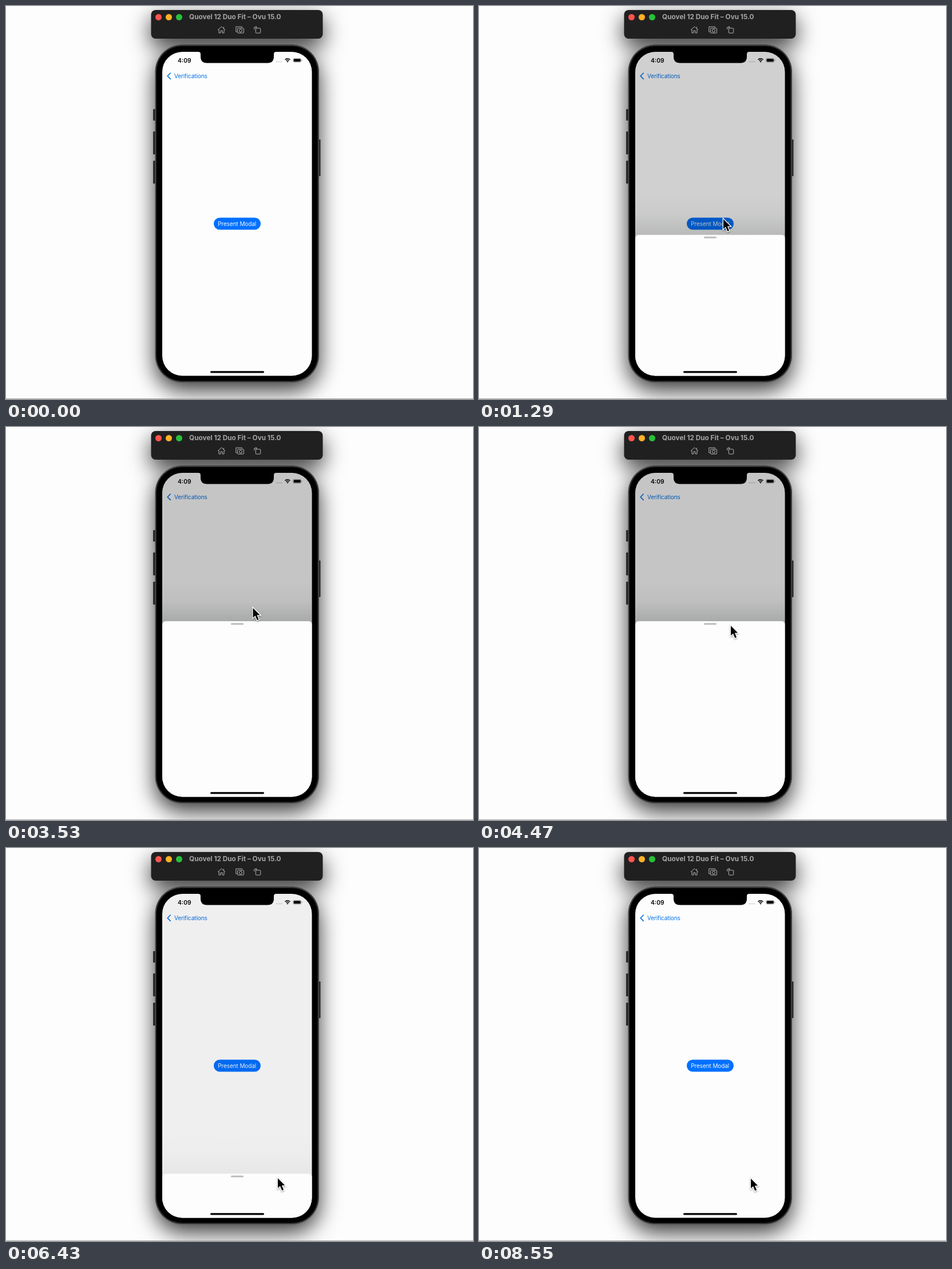
Recreate the animation shown at these times as an HTML page with a canvas. Size 816 px wide and 686 px high, loop 8.57 s.

```html
<!DOCTYPE html>
<html lang="en">
<head>
<meta charset="utf-8">
<title>Sheet presentation</title>
<style>
html, body { margin: 0; width: 100%; height: 100%; overflow: hidden; background: #fdfdfd; }
canvas { display: block; width: 816px; height: 686px; }
</style>
</head>
<body>
<canvas id="stage" width="816" height="686"></canvas>
<script>
const W = 816, H = 686, LOOP = 8570;
const FONT = 'Inter, "Liberation Sans", sans-serif';
const REST = 339, BOTTOM = 645;
const PRESENT = 1040, GRAB = 4550, RELEASE = 6500;

// Pointer path: time, x, y
const PATH = [
  [350, 470, 704], [900, 427, 372], [1800, 427, 372], [2500, 428, 303],
  [3100, 428, 303], [4300, 440, 347], [GRAB, 440, 347], [5200, 454, 232],
  [5600, 454, 232], [6450, 475, 577]
];

const ctx = document.getElementById('stage').getContext('2d');

function box(g, x, y, w, h, r, color) {
  g.beginPath();
  g.roundRect(x, y, w, h, r);
  g.fillStyle = color;
  g.fill();
}

function line(g, points, color, width) {
  g.beginPath();
  points.forEach(([x, y], i) => i ? g.lineTo(x, y) : g.moveTo(x, y));
  g.strokeStyle = color;
  g.lineWidth = width;
  g.stroke();
}

function dot(g, x, y, r, color) {
  g.beginPath();
  g.arc(x, y, r, 0, Math.PI * 2);
  g.fillStyle = color;
  g.fill();
}

function label(g, text, x, y, size, weight, color, spacing = '0px') {
  g.font = `${weight} ${size}px ${FONT}`;
  g.letterSpacing = spacing;
  g.fillStyle = color;
  g.fillText(text, x, y);
}

function withShadow(g, draw) {
  g.save();
  g.shadowColor = 'rgba(0,0,0,0.8)';
  g.shadowBlur = 38;
  g.shadowOffsetY = 14;
  draw();
  g.restore();
}

function toolIcons(g) {
  const c = '#b4b4b4';
  g.lineJoin = 'round';
  line(g, [[370, 41.8], [376.5, 36], [383, 41.8]], c, 1);
  line(g, [[372, 41], [372, 47], [375, 47], [375, 43], [378, 43], [378, 47], [381, 47], [381, 41]], c, 1);
  line(g, [[380.5, 39], [380.5, 36.5]], c, 1);

  line(g, [[403.5, 45], [401.8, 45], [401.8, 36.2], [412.5, 36.2], [412.5, 37.5]], c, 1);
  g.beginPath();
  g.roundRect(404.5, 38.8, 11, 8.4, 1.2);
  g.stroke();
  g.beginPath();
  g.arc(410, 43, 2.5, 0, Math.PI * 2);
  g.stroke();

  g.beginPath();
  g.roundRect(436.3, 38.8, 8.4, 8.4, 1);
  g.stroke();
  line(g, [[433.8, 41], [433.8, 37], [438, 37]], c, 1);
  line(g, [[436.3, 35], [438.3, 37], [436.3, 39]], c, 1);
}

function drawBase(g) {
  g.fillStyle = '#fdfdfd';
  g.fillRect(0, 0, W, H);
  withShadow(g, () => box(g, 261, 67.5, 285.5, 589, 47, '#000'));
  withShadow(g, () => box(g, 253.5, 7, 300, 50, 8, '#202021'));

  for (const [y, h] of [[180, 20], [219, 40], [270, 40]]) box(g, 257, y, 5, h, 1.2, '#29292c');
  box(g, 545, 233, 4.5, 64, 1.2, '#29292c');

  box(g, 260.5, 67.5, 286.5, 589.5, 47, '#4b4b4a');
  box(g, 262, 69, 283.5, 586.5, 45.5, '#20201f');
  box(g, 263.2, 70.2, 281, 584, 44.5, '#000');

  ['#ff544d', '#feb225', '#27c13a'].forEach((c, i) => dot(g, 266.5 + i * 18, 19.5, 5.5, c));
  label(g, 'Quovel 12 Duo Fit – Ovu 15.0', 320, 23.4, 11.8, 700, '#a5a5a6');
  toolIcons(g);
  g.fillStyle = '#a7a7a7';
  g.fillRect(0, 685, W, 1);
}

function statusBar(g) {
  label(g, '4:09', 300, 98.6, 10.3, 600, '#000');
  for (let i = 0; i < 4; i++) dot(g, 472.6 + i * 3, 97.3, 0.9, 'rgba(0,0,0,0.28)');
  g.strokeStyle = '#000';
  g.lineWidth = 1.5;
  for (const r of [3.7, 6.2]) {
    g.beginPath();
    g.arc(492, 98, r, -Math.PI * 0.76, -Math.PI * 0.24);
    g.stroke();
  }
  g.beginPath();
  g.moveTo(492, 98.6);
  g.arc(492, 98.4, 2.2, -Math.PI * 0.76, -Math.PI * 0.24);
  g.fillStyle = '#000';
  g.fill();

  g.beginPath();
  g.roundRect(501.6, 91.3, 14.2, 7, 2.1);
  g.strokeStyle = 'rgba(0,0,0,0.4)';
  g.lineWidth = 0.7;
  g.stroke();
  box(g, 502.6, 92.3, 12.2, 5, 1.2, '#000');
  box(g, 516.7, 93.6, 0.9, 2.4, 0.5, 'rgba(0,0,0,0.4)');
}

function page(g) {
  g.fillStyle = '#fdfdfd';
  g.fillRect(273, 80, 262, 566);
  statusBar(g);
  g.lineCap = 'round';
  g.lineJoin = 'round';
  line(g, [[287.3, 117], [282.2, 122.2], [287.3, 127.4]], '#006fe6', 1.6);
  label(g, 'Verifications', 294, 125.8, 10, 400, '#006fe6', '-0.1px');
  box(g, 363, 369.5, 82, 21, 10.5, '#0070ff');
  label(g, 'Present Modal', 370.3, 383.8, 10, 400, '#f5faff', '-0.1px');
}

function notch(g) {
  g.beginPath();
  g.moveTo(336, 79);
  g.lineTo(336, 80);
  g.quadraticCurveTo(340, 80, 340, 84);
  g.lineTo(340, 88);
  g.quadraticCurveTo(340, 99.5, 351, 99.5);
  g.lineTo(457, 99.5);
  g.quadraticCurveTo(468, 99.5, 468, 88);
  g.lineTo(468, 84);
  g.quadraticCurveTo(468, 80, 472, 80);
  g.lineTo(472, 79);
  g.fillStyle = '#000';
  g.fill();
}

function pointerAt(t) {
  if (t <= PATH[0][0]) return PATH[0].slice(1);
  for (let i = 1; i < PATH.length; i++) {
    const [t0, x0, y0] = PATH[i - 1], [t1, x1, y1] = PATH[i];
    if (t < t1) {
      const u = (t - t0) / (t1 - t0), e = u * u * (3 - 2 * u);
      return [x0 + (x1 - x0) * e, y0 + (y1 - y0) * e];
    }
  }
  return PATH[PATH.length - 1].slice(1);
}

// Critically damped spring progress
function spring(ms, rate) {
  const k = Math.max(0, ms) / 1000 * rate;
  return 1 - (1 + k) * Math.exp(-k);
}

// Dragging above the resting place meets resistance
function draggedTo(t) {
  const d = pointerAt(t)[1] - 347;
  return REST + (d < 0 ? d * 0.2 : d);
}

function sheetTop(t) {
  if (t < PRESENT) return BOTTOM + 5;
  if (t < GRAB) return BOTTOM + (REST - BOTTOM) * spring(t - PRESENT, 12);
  if (t < RELEASE) return draggedTo(t);
  const from = draggedTo(RELEASE);
  return from + (BOTTOM + 3 - from) * spring(t - RELEASE, 13.6);
}

function sheet(g, y) {
  const shown = Math.max(0, Math.min(1, (BOTTOM - y) / (BOTTOM - REST)));
  if (!shown) return;
  g.fillStyle = `rgba(0,0,0,${0.225 * shown})`;
  g.fillRect(273, 80, 262, 566);

  const reach = 70, fade = g.createLinearGradient(0, y - reach, 0, y);
  fade.addColorStop(0, 'rgba(20,35,25,0)');
  fade.addColorStop(0.5, `rgba(20,35,25,${0.04 * shown})`);
  fade.addColorStop(1, `rgba(20,35,25,${0.16 * shown})`);
  g.fillStyle = fade;
  g.fillRect(273, y - reach, 262, reach + 8);

  box(g, 273, y, 262, 330, [6, 6, 0, 0], '#fdfdfd');
  box(g, 393, y + 3.2, 22, 3, 1.5, '#bcbcc0');
}

function pointer(g, x, y) {
  g.save();
  g.translate(x, y);
  g.beginPath();
  [[0, 0], [0, 17], [4, 13.4], [7.3, 21.3], [10.1, 20.1], [6.9, 12.4], [12.2, 12.2]]
    .forEach(([a, b], i) => i ? g.lineTo(a, b) : g.moveTo(a, b));
  g.closePath();
  g.lineJoin = 'miter';
  g.shadowColor = 'rgba(0,0,0,0.35)';
  g.shadowBlur = 3;
  g.shadowOffsetY = 1.5;
  g.strokeStyle = '#fff';
  g.lineWidth = 2.6;
  g.stroke();
  g.shadowColor = 'transparent';
  g.fillStyle = '#000';
  g.fill();
  g.restore();
}

const base = document.createElement('canvas');
base.width = W;
base.height = H;
drawBase(base.getContext('2d'));

function render(t) {
  ctx.drawImage(base, 0, 0);
  ctx.save();
  ctx.beginPath();
  ctx.roundRect(273, 80, 261.5, 565.5, 35);
  ctx.clip();
  page(ctx);
  sheet(ctx, sheetTop(t));
  notch(ctx);
  box(ctx, 357, 637.3, 94, 3.2, 1.6, '#000');
  ctx.restore();
  if (t > PATH[0][0]) pointer(ctx, ...pointerAt(t));
}

const start = performance.now();
function tick() {
  render((performance.now() - start) % LOOP);
  requestAnimationFrame(tick);
}
tick();
</script>
</body>
</html>
```
